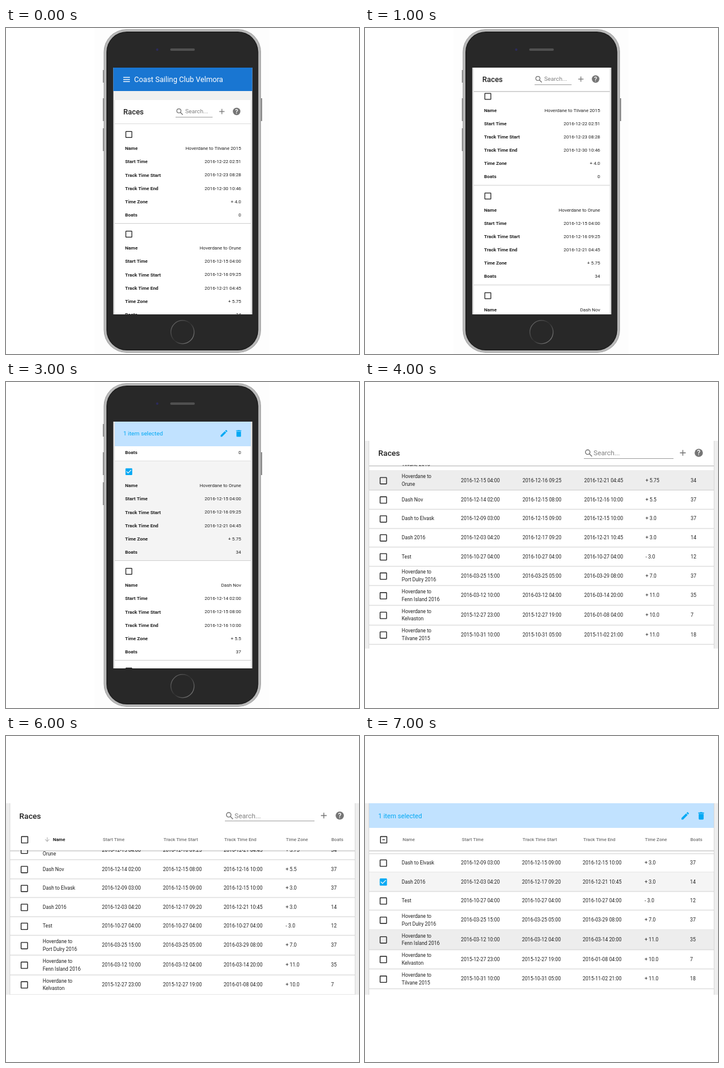
Animation, 587 px wide and 543 px high, one loop 8 s. Source, as an HTML page with a canvas:

```html
<!DOCTYPE html>
<html lang="en">
<head>
<meta charset="utf-8">
<title>Race list</title>
<style>
html, body { margin: 0; width: 100%; height: 100%; overflow: hidden; background: #fff; }
canvas { display: block; width: 587px; height: 543px; }
</style>
</head>
<body>
<canvas id="stage"></canvas>
<script>
const W = 587, H = 543, STEP = 1000;
const canvas = document.getElementById('stage');
const ctx = canvas.getContext('2d');
const dpr = window.devicePixelRatio || 1;
canvas.width = W * dpr;
canvas.height = H * dpr;

const BLUE = '#03a9f4', PALE = '#c1e2ff', GREY = '#757575', INK = '#212121', LINE = '#d0d0d0';

// name, start, track start, track end, zone, boats
const races = [
  ['Hoverdane to|Tilvane 2015', '2016-12-22 02:51', '2016-12-23 08:28', '2016-12-30 10:46', '+ 4.0', '0'],
  ['Hoverdane to|Orune', '2016-12-15 04:00', '2016-12-16 09:25', '2016-12-21 04:45', '+ 5.75', '34'],
  ['Dash Nov', '2016-12-14 02:00', '2016-12-15 08:00', '2016-12-16 10:00', '+ 5.5', '37'],
  ['Dash to Elvask', '2016-12-09 03:00', '2016-12-15 09:00', '2016-12-15 10:00', '+ 3.0', '37'],
  ['Dash 2016', '2016-12-03 04:20', '2016-12-17 09:20', '2016-12-21 10:45', '+ 3.0', '14'],
  ['Test', '2016-10-27 04:00', '2016-10-27 04:00', '2016-10-27 04:00', '- 3.0', '12'],
  ['Hoverdane to|Port Dulry 2016', '2016-03-25 15:00', '2016-03-25 05:00', '2016-03-29 08:00', '+ 7.0', '37'],
  ['Hoverdane to|Fenn Island 2016', '2016-03-12 10:00', '2016-03-12 04:00', '2016-03-14 20:00', '+ 11.0', '35'],
  ['Hoverdane to|Kelvaston', '2015-12-27 23:00', '2015-12-27 19:00', '2016-01-08 04:00', '+ 10.0', '7'],
  ['Hoverdane to|Tilvane 2015', '2015-10-31 10:00', '2015-10-31 05:00', '2015-11-02 21:00', '+ 11.0', '18']
];
const labels = ['Name', 'Start Time', 'Track Time Start', 'Track Time End', 'Time Zone', 'Boats'];

// Icons on a 24 unit grid
const icons = {
  box: 'M19 5v14H5V5h14m0-2H5c-1.1 0-2 .9-2 2v14c0 1.1.9 2 2 2h14c1.1 0 2-.9 2-2V5c0-1.1-.9-2-2-2z',
  tick: 'M19 3H5c-1.1 0-2 .9-2 2v14c0 1.1.9 2 2 2h14c1.1 0 2-.9 2-2V5c0-1.1-.9-2-2-2zm-9 14l-5-5 1.4-1.4 3.6 3.6 7.6-7.6L19 8z',
  plus: 'M19 13h-6v6h-2v-6H5v-2h6V5h2v6h6z',
  pencil: 'M3 17.25V21h3.75L17.8 9.95 14.05 6.2zM20.7 7.05c.4-.4.4-1 0-1.4l-2.35-2.35c-.4-.4-1-.4-1.4 0l-1.85 1.85 3.75 3.75z',
  bin: 'M6 19c0 1.1.9 2 2 2h8c1.1 0 2-.9 2-2V7H6zM19 4h-3.5l-1-1h-5l-1 1H5v2h14z',
  arrow: 'M20 12l-1.4-1.4L13 16.2V4h-2v12.2l-5.6-5.6L4 12l8 8z'
};
for (const key in icons) icons[key] = new Path2D(icons[key]);

function rect(x, y, w, h, color) {
  ctx.fillStyle = color;
  ctx.fillRect(x, y, w, h);
}

function round(x, y, w, h, r, color) {
  ctx.beginPath();
  ctx.roundRect(x, y, w, h, r);
  ctx.fillStyle = color;
  ctx.fill();
}

// y is the middle of the capital letters
function text(s, x, y, size, color = INK, weight = 400, align = 'left') {
  ctx.font = `${weight} ${size}px Roboto, sans-serif`;
  ctx.textAlign = align;
  ctx.fillStyle = color;
  ctx.fillText(s, x, y + size * 0.355);
}

function icon(name, x, y, size, color) {
  ctx.save();
  ctx.translate(x - size / 2, y - size / 2);
  ctx.scale(size / 24, size / 24);
  ctx.fillStyle = color;
  ctx.fill(icons[name]);
  ctx.restore();
}

function checkbox(x, y, size, on) {
  icon(on ? 'tick' : 'box', x, y, size, on ? BLUE : INK);
}

function lens(x, y, size) {
  ctx.strokeStyle = GREY;
  ctx.lineWidth = size * 0.085;
  ctx.beginPath();
  ctx.arc(x - size * 0.1, y - size * 0.1, size * 0.23, 0, Math.PI * 2);
  ctx.moveTo(x + size * 0.08, y + size * 0.08);
  ctx.lineTo(x + size * 0.33, y + size * 0.33);
  ctx.stroke();
}

function help(x, y, size) {
  ctx.fillStyle = GREY;
  ctx.beginPath();
  ctx.arc(x, y, size * 0.415, 0, Math.PI * 2);
  ctx.fill();
  text('?', x, y, size * 0.72, '#fff', 500, 'center');
}

function clip(x, y, w, h, draw) {
  ctx.save();
  ctx.beginPath();
  ctx.rect(x, y, w, h);
  ctx.clip();
  draw();
  ctx.restore();
}

const phoneBar = { left: 181, right: 407, title: 195, size: 12.4, count: 9.7, lens: 289, hint: 298, hintSize: 9.8,
  rule: [282, 343.5], plus: 359, help: 383.5, edit: 362.5, bin: 387, icon: 15 };
const deskBar = { left: 7, right: 580, title: 22, size: 13.2, count: 10.7, lens: 372, hint: 380, hintSize: 11.3,
  rule: [364, 513], plus: 528.5, help: 555, edit: 532.5, bin: 559, icon: 16.5 };

function toolbar(b, top, bottom, y, selected) {
  rect(b.left, top, b.right - b.left, bottom - top, selected ? PALE : '#fff');
  if (selected) {
    text('1 item selected', b.title, y, b.count, BLUE);
    icon('pencil', b.edit, y, b.icon, BLUE);
    icon('bin', b.bin, y, b.icon, BLUE);
    return;
  }
  text('Races', b.title, y, b.size, INK, 500);
  lens(b.lens, y, b.icon);
  text('Search...', b.hint, y - 0.5, b.hintSize, '#808080');
  rect(b.rule[0], Math.floor(y + 8.5), b.rule[1] - b.rule[0], 1, '#a0a0a0');
  icon('plus', b.plus, y - 0.5, b.icon, GREY);
  help(b.help, y - 0.5, b.icon);
}

// Translucent, so that rows show through as they slide under
function shadow(x, y, w) {
  rect(x, y, w, 1, 'rgba(0,0,0,.22)');
  rect(x, y + 1, w, 1, 'rgba(0,0,0,.1)');
}

function phoneBody() {
  rect(147, 0, 291, H, '#fdfdfd');
  for (const [y, h] of [[70, 21], [117, 38], [167, 38]]) rect(161, y, 3, h, '#8c8c8c');
  rect(423, 117, 3, 38, '#8c8c8c');
  round(162.5, 2, 261.5, 539, 38, '#9a9a9a');
  round(163.3, 2.8, 259.9, 537.4, 37, '#b8b8b8');
  round(167, 6, 252.5, 531, 34, '#1c1c1c');
  round(168.5, 7.5, 249.5, 528, 32, '#282828');
  round(273, 34, 41, 4, 2, '#505050');
  ctx.fillStyle = '#2c2b5c';
  ctx.beginPath();
  ctx.arc(251.5, 36, 2, 0, Math.PI * 2);
  ctx.fill();
  const g = ctx.createLinearGradient(278, 492, 309, 520);
  g.addColorStop(0, '#666');
  g.addColorStop(0.5, '#303030');
  g.addColorStop(1, '#777');
  ctx.strokeStyle = g;
  ctx.lineWidth = 1.3;
  ctx.beginPath();
  ctx.arc(293.5, 506.5, 19.3, 0, Math.PI * 2);
  ctx.stroke();
}

function card(race, top, on) {
  if (on) rect(181, top, 226, 166, '#f4f4f4');
  checkbox(204.3, top + 17.8, 15, on);
  race.forEach((value, i) => {
    const y = top + 41 + i * 22.1;
    text(labels[i], 198, y, 7.9, INK, 700);
    text(value.replace('|', ' '), 391, y, 7.8, INK, 400, 'right');
  });
  rect(181, top + 165.5, 226, 1, LINE);
}

function phone({ top, atStart, selected }) {
  phoneBody();
  clip(178.5, 66, 231, 411, () => {
    rect(178, 66, 232, 411, '#f0f0f0');
    const cardTop = atStart ? 120 : 66;
    rect(180, cardTop, 228, 411, '#e0e0e0');
    rect(181, cardTop, 226, 411, '#fff');
    for (let i = 0; i < 4; i++) card(races[i], top + 166 * i, i === selected);
    if (atStart) {
      rect(178, 66, 232, 39, '#1976d2');
      for (let i = 0; i < 3; i++) rect(195, 81.6 + i * 3.5, 11, 1.3, '#fff');
      text('Coast Sailing Club Velmora', 213, 86, 12.3, '#fff');
      toolbar(phoneBar, 120, 159, 139.5);
      rect(181, 159, 226, 1, '#dedede');
    } else {
      const on = selected !== undefined;
      toolbar(phoneBar, 66, on ? 107 : 105, 85.5, on);
      if (!on) shadow(181, 105, 226);
    }
  });
}

function tableRow(race, y, h, cols, on, hover) {
  if (on || hover) rect(7, y, 573, h, hover ? '#ededed' : '#f5f5f5');
  const mid = y + h / 2;
  checkbox(30.5, mid + 0.4, 16, on);
  race.forEach((value, i) => {
    const lines = value.split('|');
    lines.forEach((s, k) => text(s, cols[i], mid + (k - (lines.length - 1) / 2) * 12.7 - 0.2, 8.3));
  });
  rect(7, Math.round(y + h) - 0.5, 573, 1, LINE);
}

function headings(sorted, partial) {
  rect(7, 153, 573, 37, '#fff');
  checkbox(31, 172.8, 16, false);
  if (partial) rect(28.8, 172.2, 4.4, 1.2, INK);
  if (sorted) icon('arrow', 68.5, 172.5, 11, '#aaa');
  const xs = [sorted ? 78 : 62.5, 161, 262, 363, 465.5, 541];
  labels.forEach((s, i) => {
    const strong = sorted && i === 0;
    text(s, xs[i], 172.5, 7.7, strong ? INK : GREY, strong ? 700 : 500);
  });
  shadow(7, 190.5, 573);
}

// anchor is the top edge of the third row
function table({ anchor, full, selected, hover }) {
  const top = full ? 98 : 112, bottom = full ? 444 : 431;
  const cols = full ? [61, 159.5, 262, 364.5, 466.5, 541.5] : [61, 159.5, 261, 362, 465, 540.5];
  const on = selected !== undefined;
  clip(0, top, W, bottom - top, () => {
    rect(0, top, W, bottom - top, '#eee');
    rect(6, top, 575, bottom - top, '#d8d8d8');
    rect(7, top, 573, bottom - top, '#fff');
    let y = anchor - 65.4;
    races.forEach((race, i) => {
      const h = race[0].includes('|') ? 32.7 : 31.55;
      tableRow(race, y, h, cols, i === selected, i === hover);
      y += h;
    });
    toolbar(deskBar, top, full ? 138 : 153, full ? 118.5 : 133, on);
    if (full) shadow(7, 139, 573);
    else headings(!on, on);
  });
}

const scenes = [
  () => phone({ top: 159.5, atStart: true }),
  () => phone({ top: 96 }),
  () => phone({ top: 30, selected: 1 }),
  () => phone({ top: -34.5, selected: 1 }),
  () => table({ anchor: 180.4, full: true, hover: 1 }),
  () => table({ anchor: 180.4, full: true, selected: 1 }),
  () => table({ anchor: 206.2 }),
  () => table({ anchor: 164, selected: 4, hover: 7 })
];

const start = performance.now();
function frame() {
  const t = performance.now() - start;
  ctx.setTransform(dpr, 0, 0, dpr, 0, 0);
  rect(0, 0, W, H, '#fff');
  scenes[Math.floor(t / STEP) % scenes.length]();
  requestAnimationFrame(frame);
}
frame();
</script>
</body>
</html>
```
